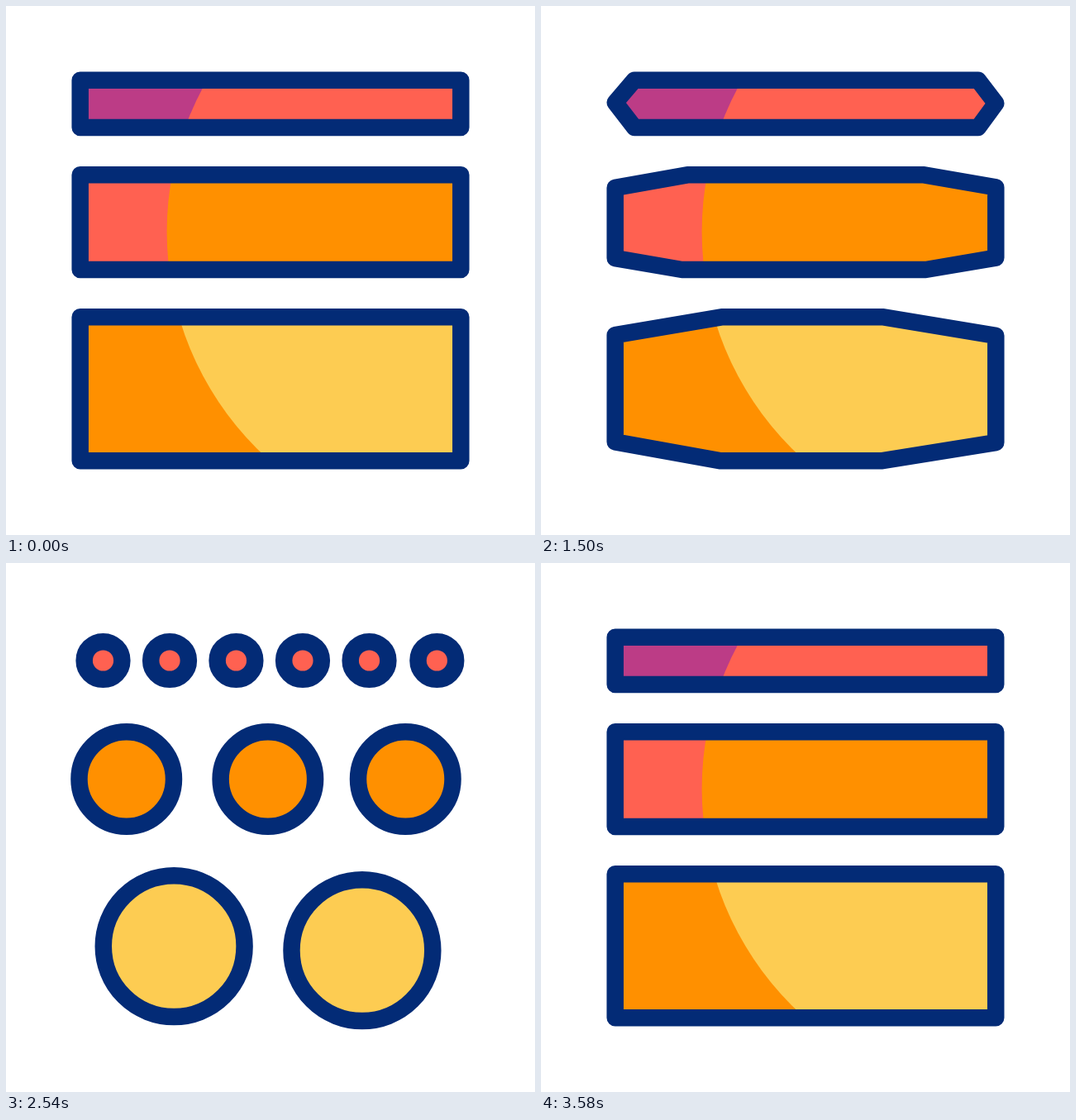
These frames come from a looping animation (640 px wide and 640 px high, 3.6 s). An HTML page with a canvas:

```html
<!DOCTYPE html>
<html lang="en">
<head>
<meta charset="utf-8">
<title>Bars and circles</title>
<style>
  html, body { margin: 0; width: 100%; height: 100%; overflow: hidden; background: #fff; }
  canvas { display: block; width: 100vmin; height: 100vmin; }
</style>
</head>
<body>
<canvas id="stage" width="640" height="640"></canvas>
<script>
const ctx = document.getElementById("stage").getContext("2d");
const LOOP = 3600;
const NAVY = "#032b76", PURPLE = "#bc3c86", RED = "#ff6151", ORANGE = "#ff9000", YELLOW = "#fdcc52";
const LEFT = 89.7, RIGHT = 550.3;

// Flat edges run from tl to tr and bl to br; tips are the heights of the end points.
const bars = [
  { top: 89.7, bottom: 147, shade: PURPLE, fill: RED, thin: true,
    tl: 180, tr: 467, bl: 180.5, br: 467, tipL: 116.8, tipR: 117.8 },
  { top: 204.3, bottom: 319, shade: RED, fill: ORANGE,
    tl: 177, tr: 463.5, bl: 170.5, br: 465.5, tipL: 265, tipR: 263 },
  { top: 376.3, bottom: 550.3, shade: ORANGE, fill: YELLOW,
    tl: 218.3, tr: 414.5, bl: 217.5, br: 411.5, tipL: 461, tipR: 464 }
];

// x: place when spread out, pull: share of the squeeze each circle follows
const rows = [
  { r: 22.85, fill: RED, y: i => 118,
    x: [117.5, 196.7, 275.8, 355, 434.2, 514.7], pull: [0, 0.2, 0.4, 0.6, 0.8, 1] },
  { r: 57.25, fill: ORANGE, y: i => 261.6,
    x: [145.4, 314.5, 479], pull: [0.05, 0.355, 0.642] },
  { r: 85.4, fill: YELLOW, y: i => 463.7 + 5 * i,
    x: [201.9, 427.4], pull: [0.192, 0.526] }
];

const lerp = (a, b, k) => a + (b - a) * k;
const span = (t, a, b) => Math.min(1, Math.max(0, (t - a) / (b - a)));
const easeInOut = (u, p) => u < 0.5 ? Math.pow(2 * u, p) / 2 : 1 - Math.pow(2 - 2 * u, p) / 2;

function trace(points) {
  ctx.beginPath();
  points.forEach(([x, y]) => ctx.lineTo(x, y));
  ctx.closePath();
}

function outline(b, point, right) {
  if (b.thin) {
    return [
      [LEFT, b.tipL],
      [lerp(LEFT, b.tl, point), b.top], [lerp(right, b.tr, point), b.top],
      [right, b.tipR],
      [lerp(right, b.br, point), b.bottom], [lerp(LEFT, b.bl, point), b.bottom]
    ];
  }
  const ends = [
    [LEFT, lerp(b.bottom, b.tipL, point)], [LEFT, lerp(b.top, b.tipL, point)],
    [right, lerp(b.top, b.tipR, point)], [right, lerp(b.bottom, b.tipR, point)]
  ];
  if (point === 0) return ends;
  return [ends[0], ends[1], [b.tl, b.top], [b.tr, b.top],
          ends[2], ends[3], [b.br, b.bottom], [b.bl, b.bottom]];
}

function drawBar(b, point, right) {
  const shape = outline(b, point, right);
  ctx.save();
  trace(shape);
  ctx.clip();
  ctx.fillStyle = b.shade;
  ctx.fillRect(0, 0, 640, 640);
  ctx.fillStyle = b.fill;
  ctx.beginPath();
  ctx.arc(565, 273, 370.4, 0, 2 * Math.PI);
  ctx.fill();
  ctx.restore();
  trace(shape);
  ctx.stroke();
}

function drawCircles(squeeze) {
  for (const row of rows) {
    row.x.forEach((x, i) => {
      ctx.beginPath();
      ctx.arc(x - row.pull[i] * (squeeze - 7.5), row.y(i), row.r, 0, 2 * Math.PI);
      ctx.fillStyle = row.fill;
      ctx.fill();
      ctx.stroke();
    });
  }
}

function draw(t) {
  ctx.fillStyle = "#fff";
  ctx.fillRect(0, 0, 640, 640);
  ctx.strokeStyle = NAVY;
  ctx.lineWidth = 20.5;
  ctx.lineJoin = "round";

  if (t >= 1600 && t < 3060) {
    const away = t < 2350 ? 1 - span(t, 1600, 2220) : span(t, 2470, 3050);
    drawCircles(163 * Math.pow(away, 2.5));
    return;
  }
  let point = 0, right = RIGHT;
  if (t < 800) point = easeInOut(span(t, 55, 600), 2.2);
  else if (t < 1600) point = 1 - Math.pow(span(t, 990, 1600), 1.68);
  else right -= 210 * Math.pow((LOOP - t) / 520, 2.4);
  bars.forEach(b => drawBar(b, point, right));
}

const start = performance.now();
function tick() {
  draw((performance.now() - start) % LOOP);
  requestAnimationFrame(tick);
}
tick();
</script>
</body>
</html>
```
